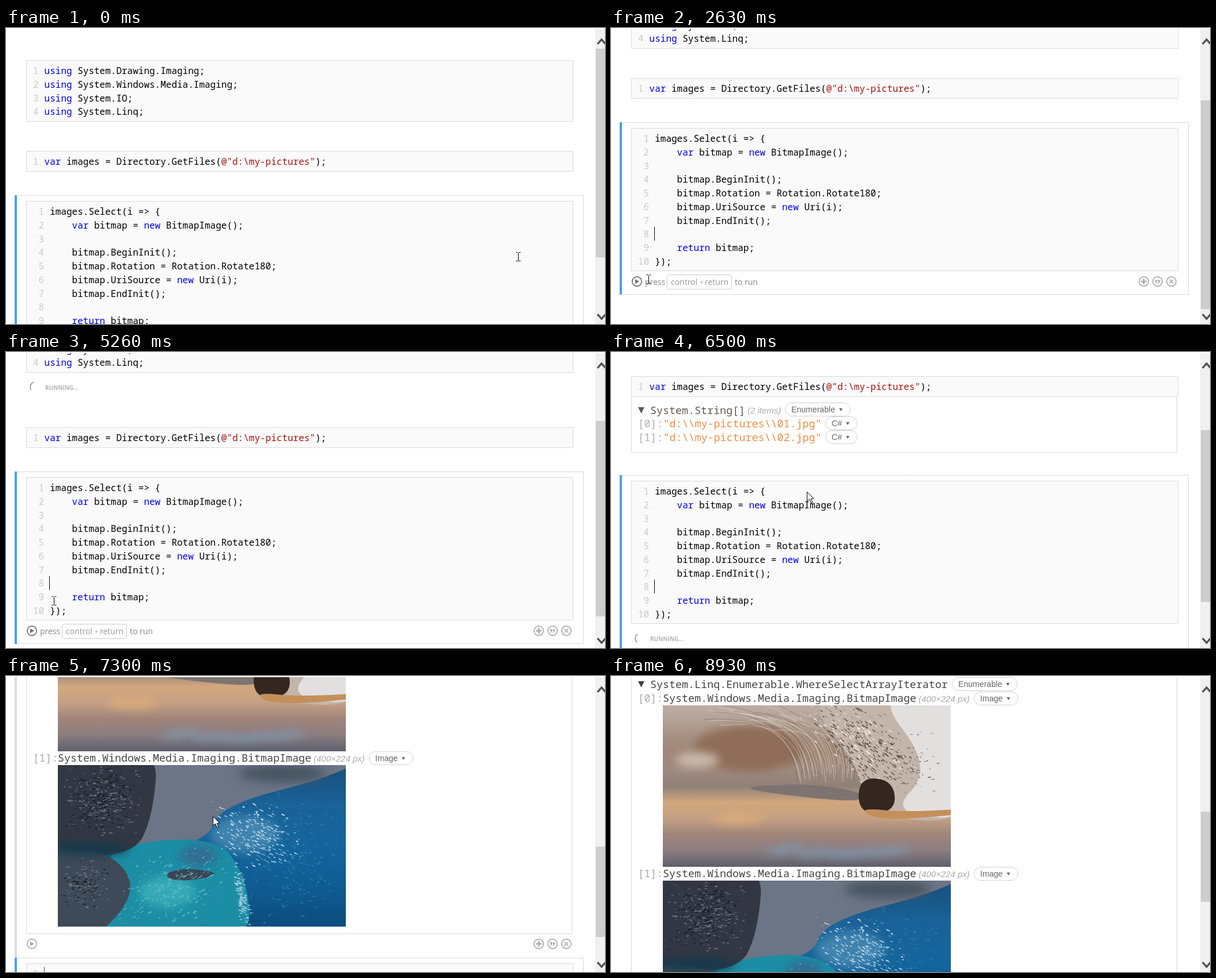
Recreate the animation shown at these times as an HTML page with a canvas. Size 1040x515 px, loop 9940 ms.

```html
<!DOCTYPE html>
<html lang="en">
<head>
<meta charset="utf-8">
<title>Notebook</title>
<style>
html, body { margin: 0; width: 100%; height: 100%; overflow: hidden; background: #fff; }
canvas { display: block; }
</style>
</head>
<body>
<canvas id="stage" width="1040" height="515"></canvas>
<script>
const ctx = document.getElementById('stage').getContext('2d');
const LOOP = 9940, STEPS = 49;
const MONO = '"Noto Sans Mono", monospace';
const SANS = '"Liberation Sans", sans-serif';
const UI = '"Open Sans", sans-serif';
const LINE = '#d9d9d9', ICON = '#aaa';

// Pointer and page movements; from and to count screen updates.
const moves = [
  { from: 0, to: 3, dx: -195, dy: -58, scroll: 127 },
  { from: 5, to: 6, dx: -211, dy: -10 },
  { from: 6, to: 11, dx: -437, dy: 111 },
  { from: 11, to: 15, dx: 37, dy: -8 },
  { from: 27, to: 32, dx: 257, dy: -190, scroll: 45 },
  { from: 33, to: 35, dx: 17, dy: 1, scroll: 780 },
  { from: 35, to: 38, dx: 7, dy: 1, scroll: -376 },
  { from: 39, to: 44, dy: 290, scroll: 78 }
];
const clamp = v => Math.min(1, Math.max(0, v));
const ease = v => v * v * (3 - 2 * v);
const moved = (key, n) => Math.round(moves.reduce((sum, m) =>
  sum + (m[key] || 0) * ease(clamp((n - m.from) / (m.to - m.from))), 0));

const imports = ['Drawing.Imaging', 'Windows.Media.Imaging', 'IO', 'Linq'].map(s => `using System.${s};`);
const listing = ['var images = Directory.GetFiles(@"d:\\my-pictures");'];
const rotating = `images.Select(i => {
    var bitmap = new BitmapImage();

    bitmap.BeginInit();
    bitmap.Rotation = Rotation.Rotate180;
    bitmap.UriSource = new Uri(i);
    bitmap.EndInit();

    return bitmap;
});`.split('\n');

function text(s, x, y, font, color) {
  ctx.font = font;
  ctx.fillStyle = color;
  ctx.fillText(s, x, y);
}

function path(...pts) {
  ctx.beginPath();
  for (const [x, y] of pts) ctx.lineTo(x, y);
}

function fill(color, ...pts) {
  path(...pts);
  ctx.fillStyle = color;
  ctx.fill();
}

function line(color, width, ...pts) {
  path(...pts);
  ctx.strokeStyle = color;
  ctx.lineWidth = width;
  ctx.stroke();
}

function arc(x, y, r, color, width, a = 0, b = 7) {
  ctx.beginPath();
  ctx.arc(x, y, r, a, b);
  ctx.strokeStyle = color;
  ctx.lineWidth = width;
  ctx.stroke();
}

function frame(x, y, w, h, r = 0, color = LINE) {
  ctx.beginPath();
  ctx.roundRect(x + .5, y + .5, w - 1, h - 1, r);
  ctx.strokeStyle = color;
  ctx.lineWidth = 1;
  ctx.stroke();
}

function rect(color, x, y, w, h) {
  ctx.fillStyle = color;
  ctx.fillRect(x, y, w, h);
}

// ---- pictures: soft gradients, a few curved areas and seeded grain ----
let seed = 7;
const rnd = () => (seed = seed * 16807 % 2147483647) / 2147483647;
const spread = () => rnd() + rnd() - 1;

function picture(colors, paint) {
  const c = document.createElement('canvas');
  c.width = 500;
  c.height = 281;
  const g = c.getContext('2d'), sky = g.createLinearGradient(0, 0, 0, 281);
  colors.forEach((color, i) => sky.addColorStop(i / (colors.length - 1), color));
  g.fillStyle = sky;
  g.fillRect(0, 0, 500, 281);
  paint(g);
  return c;
}

// Closed curve pulled towards each point in turn.
function area(g, color, ...pts) {
  g.fillStyle = color;
  g.beginPath();
  pts.forEach(([x, y], i) => {
    const [u, v] = pts[(i + 1) % pts.length];
    if (!i) g.moveTo((x + pts.at(-1)[0]) / 2, (y + pts.at(-1)[1]) / 2);
    g.quadraticCurveTo(x, y, (x + u) / 2, (y + v) / 2);
  });
  g.fill();
}

function glow(g, color, x, y, rx, ry) {
  g.filter = 'blur(8px)';
  g.fillStyle = color;
  g.beginPath();
  g.ellipse(x, y, rx, ry, 0, 0, 7);
  g.fill();
  g.filter = 'none';
}

// Short strokes scattered around a centre, following a slope.
function grain(g, n, color, x, y, rx, ry, tilt = 0) {
  g.strokeStyle = color;
  for (let i = 0; i < n; i++) {
    const v = spread(), px = x + spread() * rx + v * tilt, py = y + v * ry, len = 1 + rnd() * 5;
    g.lineWidth = .5 + rnd() * 1.5;
    g.beginPath();
    g.moveTo(px, py);
    g.lineTo(px + len, py + len * tilt / 60);
    g.stroke();
  }
}

const slope = picture(['#bcada2', '#b3a195', '#a48f81', '#a08878', '#9f8b7f', '#8f8079',
  '#d2a77d', '#c4a084', '#9f8579', '#8b7d80', '#5d5f6c'], g => {
  glow(g, '#8f6d58', 150, 75, 95, 40);
  glow(g, '#cabaad', 60, 95, 38, 13);
  glow(g, '#dcac79', 130, 197, 45, 9);
  for (let i = 0; i < 9; i++) glow(g, '#7f9fb9', 200 + i * 26, 255 + spread() * 14, 22, 4);
  for (let i = 0; i < 45; i++) {
    g.strokeStyle = i % 3 ? '#e3d8cf99' : '#6f584a77';
    g.beginPath();
    g.moveTo(70 + i * 6, spread() * 30 + 20);
    g.quadraticCurveTo(220 + i * 3, 15 + i, 235 + i * 2.5, 115 + spread() * 25);
    g.stroke();
  }
  area(g, '#7d7370', [120, 142], [260, 136], [350, 152], [345, 168], [240, 160]);
  area(g, '#c3b5aa', [230, -30], [560, -30], [560, 205], [350, 195], [345, 110]);
  area(g, '#e2e0df', [360, -30], [560, -30], [560, 200], [390, 190], [470, 110]);
  grain(g, 320, '#65544a', 350, 65, 70, 75, 50);
  grain(g, 120, '#f1eeeb', 340, 65, 80, 75, 50);
  grain(g, 60, '#85766c', 430, 110, 50, 70);
  area(g, '#33271f', [340, 125], [400, 130], [405, 185], [340, 190]);
  area(g, '#c58f5b', [340, 178], [420, 186], [560, 178], [510, 192], [370, 200]);
});

const ice = picture(['#174f7c', '#1a6298', '#14659c', '#0f5c92', '#0d4c7d'], g => {
  glow(g, '#3f83ae', 325, 120, 60, 32);
  area(g, '#6b7585', [100, -60], [600, -60], [500, 15], [280, 70], [260, 135], [100, 155]);
  glow(g, '#4a5562', 390, 15, 75, 16);
  area(g, '#1b8da5', [60, 310], [115, 225], [70, 145], [270, 120], [330, 195], [335, 320]);
  glow(g, '#33a9b5', 190, 220, 50, 28);
  glow(g, '#326d92', 245, 158, 32, 18);
  area(g, '#333743', [-40, -40], [175, -40], [165, 90], [130, 160], [-40, 155]);
  area(g, '#3e4a57', [-40, 140], [95, 150], [140, 220], [60, 310], [-40, 310]);
  glow(g, '#163a4c', 55, 145, 70, 12);
  area(g, '#3b4452', [180, 190], [225, 178], [290, 190], [210, 204]);
  for (const [color, tilt] of [['#707585', 0], ['#191e28', -15]]) {
    grain(g, 260, color, 75, 60, 70, 65, tilt);
    grain(g, 90, color, 45, 210, 45, 50, tilt);
  }
  grain(g, 260, '#c3dcea', 345, 120, 75, 60, 30);
  grain(g, 260, '#2f7fb3', 400, 160, 95, 120, 20);
  grain(g, 260, '#63bac5', 200, 215, 95, 70, -35);
  grain(g, 160, '#a9cfe0', 318, 230, 12, 60, 10);
});

// ---- notebook parts ----
function codeBox(y, h, lines) {
  rect('#fafafa', 35, y, 950, h);
  frame(35, y, 950, h);
  const digits = String(lines.length).length, font = '16px ' + MONO;
  lines.forEach((s, i) => {
    const base = y + 24 + i * 23.75;
    text(String(i + 1).padStart(digits), 47, base, font, '#cacaca');
    let x = 57 + 9.6 * digits;
    for (const part of s.split(/(\b(?:using|var|new|return)\b|@"[^"]*")/)) {
      const color = part[0] === '@' ? '#a31515' : /^(using|var|new|return)$/.test(part) ? '#0000e8' : '#000';
      text(part, x, base, font, color);
      x += part.length * 9.6;
    }
  });
}

function cross(x, y, r, width, turn) {
  for (const a of [turn, turn + Math.PI / 2]) {
    const dx = r * Math.cos(a), dy = r * Math.sin(a);
    line(ICON, width, [x - dx, y - dy], [x + dx, y + dy]);
  }
}

function footer(y, hint, dark) {
  const play = dark ? '#707070' : ICON;
  arc(45, y, 8.2, play, 1.7);
  fill(play, [42, y - 4], [49, y], [42, y + 4]);
  for (const x of [925, 949, 973]) arc(x, y, 8.2, ICON, 1.7);
  cross(925, y, 5, 2.6, 0);
  cross(973, y, 5, 1.6, Math.PI / 4);
  ctx.textAlign = 'center';
  text('”', 949, y + 12.5, 'bold 22px "Noto Serif", serif', ICON);
  ctx.textAlign = 'left';
  if (!hint) return;
  const font = '14px ' + UI;
  frame(97, y - 12, 113, 26, 3, '#ccc');
  text('press', 59, y + 6, font, '#888');
  text('control', 104, y + 6, font, '#999');
  text('+', 154, y + 5, '11px ' + UI, '#999');
  text('return', 163, y + 6, font, '#999');
  text('to run', 215, y + 6, font, '#888');
}

function selection(top, bottom) {
  frame(16, top, 987, bottom - top);
  rect('#47a1ee', 15, top, 4, bottom - top);
}

function running(y, alpha, n) {
  ctx.globalAlpha = alpha;
  arc(51, y - 1, 9, '#777', 1.3, n - 32 + Math.PI * .72, n - 32 + Math.PI * 1.3);
  text('RUNNING...', 68, y + 4, 'bold 10px ' + UI, '#b5b5b5');
  ctx.globalAlpha = 1;
}

function chip(x, y, w, label) {
  frame(x, y - 12, w, 24, 12, '#d0d0d0');
  text(label, x + 11, y + 5, '14.1px ' + SANS, '#666');
  const a = x + w - 17;
  fill('#666', [a - 3, y - 2], [a + 3, y - 2], [a, y + 3]);
}

const outText = (s, x, y, color) => text(s, x, y + 6, '18.33px ' + MONO, color);
const note = (s, x, y) => text(s, x, y + 6, 'italic 15px ' + SANS, '#aaa');

function outputFrame(y, h, title, color) {
  frame(35, y - 1, 948, h + 2);
  fill(color, [47, y + 18], [58, y + 18], [52.5, y + 29]);
  outText(title, 68, y + 23.5, color);
}

function fileOutput(y) {
  outputFrame(y, 96, 'System.String[]', '#625953');
  note('(2 items)', 237, y + 23);
  chip(302, y + 22, 114, 'Enumerable');
  for (const i of [0, 1]) {
    const cy = y + 47 + 24 * i;
    outText(`[${i}]:`, 46.5, cy, '#b0b0b0');
    outText(`"d:\\\\my-pictures\\\\0${i + 1}.jpg"`, 90.5, cy, '#ee8d45');
    chip(372, cy - 1, 56, 'C#');
  }
}

function imageOutput(y) {
  outputFrame(y, 658, 'System.Linq.Enumerable.WhereSelectArrayIterator', '#444');
  chip(592, y + 23, 114, 'Enumerable');
  [slope, ice].forEach((pic, i) => {
    const cy = y + 48 + 305 * i;
    outText(`[${i}]:`, 46.5, cy, '#aaa');
    outText('System.Windows.Media.Imaging.BitmapImage', 90, cy, '#444');
    note('(400×224 px)', 534, cy);
    chip(630, cy, 77, 'Image');
    ctx.drawImage(pic, 90, cy + 12);
  });
}

function scrollbar(scroll, height) {
  const scale = 453 / height;
  rect('#f0f0f0', 1023, 2, 17, 513);
  rect('#cdcdcd', 1024, Math.round(36 + scroll * scale), 16, Math.round(515 * scale));
  for (const [y, d] of [[28, -8], [498, 8]])
    line('#505050', 3.4, [1027, y], [1034, y + d], [1041, y]);
}

function pointer(x, y, arrow) {
  ctx.save();
  ctx.translate(x + .5, y + .5);
  if (arrow) {
    const tip = [[0, 0], [0, 16], [4, 12.5], [7, 19], [9.5, 18], [6.7, 11.8], [11.5, 11.5], [0, 0]];
    fill('#fff', ...tip);
    line('#000', 1, ...tip);
  } else {
    line('#000', 1, [0, -7], [0, 7]);
    for (const end of [-8, 7])
      for (const side of [-1, 1]) line('#000', 1, [side, end], [side * 4, end]);
  }
  ctx.restore();
}

function draw(n) {
  const scroll = moved('scroll', n);
  const mx = 889 + moved('dx', n), my = 398 + moved('dy', n), hover = my < 515;
  const run1 = n >= 17 && n < 28, run2 = n >= 28 && n < 30, run3 = n >= 30 && n < 33;
  const listed = n >= 30, done = n >= 33;

  // Extra height below each code box pushes the next cell down.
  const box2 = 214 + (run1 ? 44 : 0);
  const frame3 = box2 + 77 + (run2 ? 44 : listed ? 95 : 0);
  const end3 = frame3 + 259;
  const foot3 = end3 + (done ? 658 : run3 ? 44 : 0);
  const frame4 = foot3 + 42;
  const bottom = done ? frame4 + 86 : foot3 + 41;

  rect('#fff', 0, 0, 1040, 515);
  ctx.save();
  ctx.beginPath();
  ctx.rect(0, 2, 1023, 513);
  ctx.clip();
  ctx.translate(0, -scroll);

  codeBox(56, 107, imports);
  if (run1) running(189, clamp((n - 18) / 4), n);

  if (listed) fileOutput(box2 + 36);
  codeBox(box2, 36, listing);
  if (run2) running(box2 + 62, .6, n);

  if (!done) selection(frame3, bottom);
  else if (hover) rect('#dcdcdc', 15, frame3, 4, frame4 - frame3);
  if (done) imageOutput(end3);
  codeBox(frame3 + 10, 249, rotating);
  if (run3) running(end3 + 26, 1, n);
  if (!done || hover) footer(foot3 + 18, !done, n >= 11 && !done);
  if (n >= 8 && !done && n !== 25) rect('#000', 75, frame3 + 182, 1, 24);

  if (done) {
    selection(frame4, bottom);
    codeBox(frame4 + 10, 36, ['']);
    rect('#555', 66, frame4 + 16, 1, 24);
    footer(frame4 + 63, true, false);
  }
  ctx.restore();

  scrollbar(scroll, bottom + 51);
  pointer(mx, my, n >= 28 || mx < 60);
}

const start = performance.now();
function tick() {
  const t = (performance.now() - start) % LOOP;
  // Updates land slightly ahead of an even beat.
  draw(Math.min(STEPS - 1, Math.floor((t + 28) * STEPS / LOOP)));
  requestAnimationFrame(tick);
}
tick();
</script>
</body>
</html>
```
